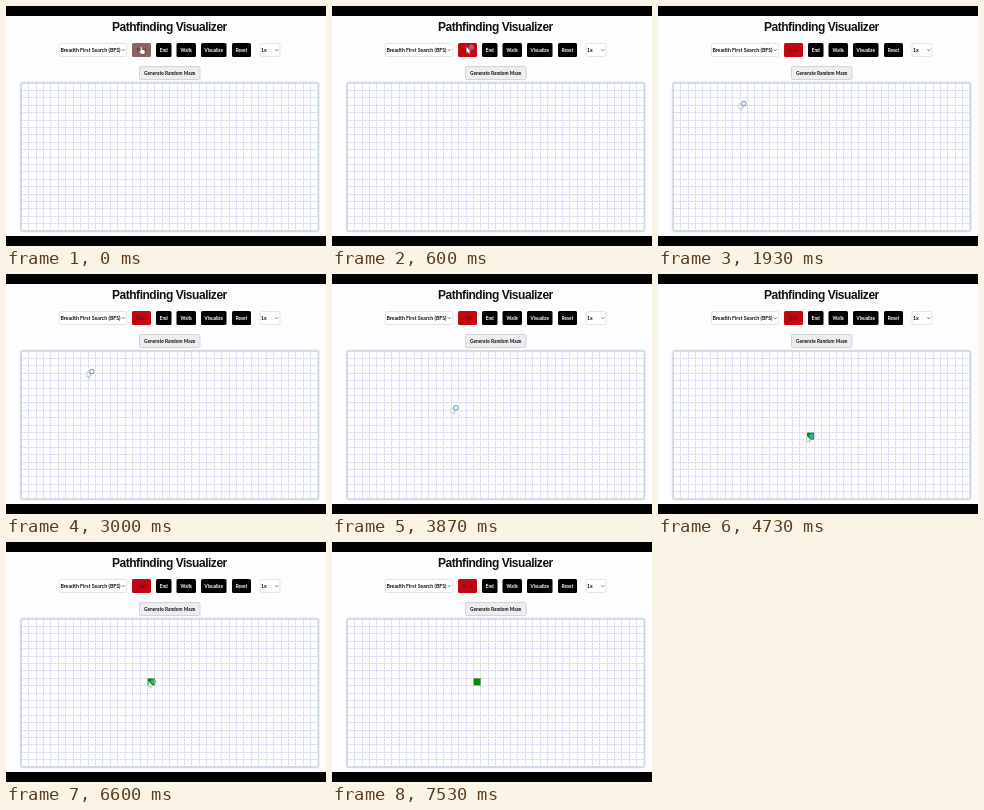
Write an HTML page that moves like this. It is 320 px wide and 240 px high and loops after 7590 ms.

```html
<!DOCTYPE html>
<html lang="en">
<head>
<meta charset="utf-8">
<title>Pathfinding Visualizer</title>
<style>
  html, body { margin: 0; width: 100%; height: 100%; overflow: hidden; background: #000; }
  svg { display: block; width: 100%; height: 100%; }
  text { font: bold 5.2px Lato, "Liberation Sans", sans-serif; fill: #111; }
  .title { font: bold 12px "Liberation Sans", Arial, sans-serif; letter-spacing: -.47px; }
  .label { font-size: 4.65px; text-anchor: middle; }
  .light { fill: #fff; }
  .maze { font-size: 4.8px; }
  .line { fill: none; stroke: #f5f2df; shape-rendering: crispEdges; }
  .dash { stroke: #d6daf4; stroke-dasharray: 2 1; }
  .chevron { fill: none; stroke: #333; stroke-width: .7; }
</style>
</head>
<body>
<svg id="stage" viewBox="0 0 320 240">
  <rect width="320" height="240"/>
  <rect y="10" width="320" height="220" fill="#fdfdff"/>
  <text class="title" x="106" y="25.4">Pathfinding Visualizer</text>
</svg>
<script>
const LOOP = 7590, STEP = 200 / 3;
const GRID = { x: 15.2, y: 77, cols: 40, rows: 20, w: 7.425, h: 7.4 };
const stage = document.getElementById('stage');

function add(tag, attrs, parent = stage, text = '') {
  const el = document.createElementNS('http://www.w3.org/2000/svg', tag);
  for (const key in attrs) el.setAttribute(key, attrs[key]);
  el.textContent = text;
  parent.append(el);
  return el;
}

function box(x, y, width, height, fill, more = {}) {
  return add('rect', { x, y, width, height, fill, rx: 1.5, ...more });
}

function button(x, width, name) {
  const face = box(x, 37, width, 14, '#000');
  const label = add('text', { x: x + width / 2, y: 45.8, class: 'label light' }, stage, name);
  return { face, label };
}

function select(x, width, name) {
  box(x, 37.5, width, 13, '#fff', { stroke: '#dcdce2', 'stroke-width': .8 });
  add('text', { x: x + 1, y: 45.8 }, stage, name);
  add('path', { class: 'chevron', d: `M${x + width - 4.7} 43.4l1.4 1.4l1.4-1.4` });
}

select(53.4, 67.2, 'Breadth First Search (BFS)');
const start = button(126, 19, 'Start');
button(150, 15.5, 'End');
button(170.5, 19.5, 'Walls');
button(195, 25.5, 'Visualize');
button(226, 19, 'Reset');
select(254, 20, '1x');

box(133.5, 60.5, 60.5, 13, '#eeeef1', { stroke: '#c9cad0', 'stroke-width': .8 });
add('text', { x: 163.7, y: 68.8, class: 'label maze' }, stage, 'Generate Random Maze');

// Board
const { x: gx, y: gy, cols, rows, w, h } = GRID;
const gw = cols * w, gh = rows * h;
const snap = v => Math.floor(v) + .5;
box(gx - .6, gy - .6, gw + 1.2, gh + 1.2, '#fdfdff', { stroke: '#e6eeea', 'stroke-width': 2, rx: 2 });
let lines = '';
for (let c = 1; c < cols; c++) lines += `M${snap(gx + c * w)} ${gy}v${gh}`;
for (let r = 1; r < rows; r++) lines += `M${gx} ${snap(gy + r * h)}h${gw}`;
add('path', { class: 'line', d: lines });
add('path', { class: 'line dash', d: lines });
box(gx, gy, gw, gh, 'none', { stroke: '#b4c8cf', 'stroke-width': .9 });

const cell = add('rect', { width: w - .4, height: h - .4, fill: '#048a06' });

// Pointers
const hand = add('path', {
  d: 'M0 .6q.8-1 1.5 0v2.5l2.5.7q.7.3.5 1.2l-.6 2.5h-3.3l-2.2-3q.3-1 1.6-.1z',
  fill: '#fff', stroke: '#555', 'stroke-width': .4
});
const arrow = add('g', {});
add('path', { d: 'M0 0v6l1.4-1.2l1 2.2l1-.5l-1-2.1h1.9z', fill: '#fff', stroke: '#9a9aa6', 'stroke-width': .5 }, arrow);
add('circle', { cx: 4.8, cy: .3, r: 2.3, fill: '#d9f0fb', 'fill-opacity': .35, stroke: '#2b8fd6', 'stroke-opacity': .85 }, arrow);

// time, x, y of the pointer tip
const PATH = [
  [0, 134.5, 40.5], [670, 134.5, 41], [1200, 126.3, 56], [1800, 81, 97.3],
  [3400, 81, 97.3], [4270, 149, 162], [4930, 149, 162], [5600, 142.5, 139.3], [7590, 142.5, 139.3]
];
// time, column, row of the start cell
const CELLS = [[4400, 18, 11], [6470, 17, 8]];
const BUSY_FROM = 400, HIDE_AT = 6870;

const mix = (a, b, p) => a + (b - a) * p;
const ease = p => p * p * (3 - 2 * p);
const blend = (a, b, p) => `rgb(${a.map((v, i) => Math.round(mix(v, b[i], p)))})`;
const show = (el, on) => el.setAttribute('visibility', on ? 'visible' : 'hidden');

function pointer(t) {
  const i = Math.max(1, PATH.findIndex(p => p[0] >= t));
  const a = PATH[i - 1], b = PATH[i];
  const p = ease((t - a[0]) / (b[0] - a[0]));
  return [mix(a[1], b[1], p), mix(a[2], b[2], p)];
}

function draw(t) {
  const p = Math.min(1, t / 600);
  start.face.setAttribute('fill', blend([138, 100, 98], [194, 7, 18], p));
  start.label.style.fill = blend([86, 48, 50], [118, 8, 24], p);

  const spot = CELLS.filter(c => c[0] <= t).pop();
  show(cell, spot);
  if (spot) {
    cell.setAttribute('x', gx + spot[1] * w + .2);
    cell.setAttribute('y', gy + spot[2] * h + .2);
  }

  const move = `translate(${pointer(t).join(' ')})`;
  hand.setAttribute('transform', move);
  arrow.setAttribute('transform', move);
  show(hand, t < BUSY_FROM);
  show(arrow, t >= BUSY_FROM && t < HIDE_AT);
}

const origin = performance.now();
function tick() {
  const t = (performance.now() - origin) % LOOP;
  const step = Math.min(113, Math.floor((t + 4) / STEP));
  draw(Math.round(step * STEP / 10) * 10);
  requestAnimationFrame(tick);
}
tick();
</script>
</body>
</html>
```
